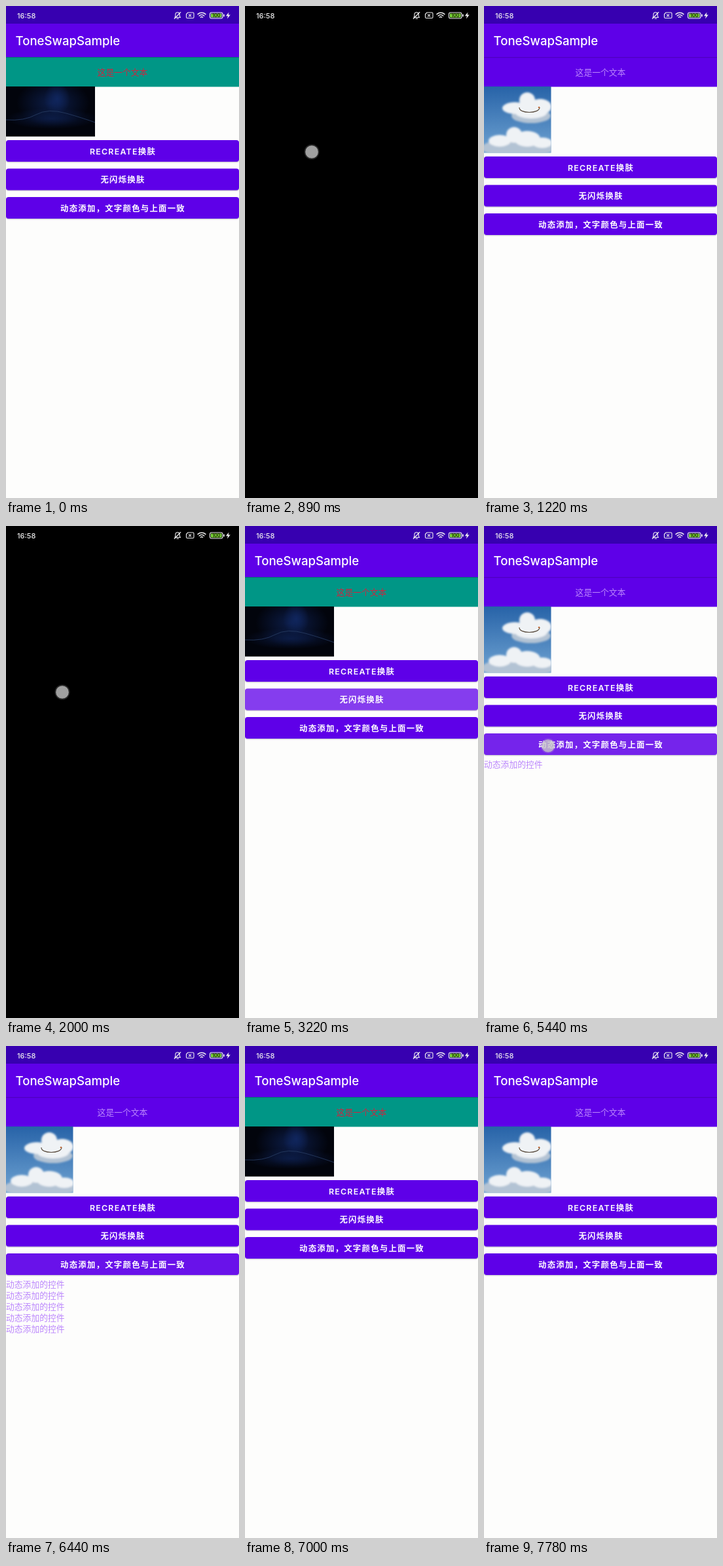
An HTML page that plays this animation: 356x752 px, repeating every 7890 ms.

```html
<!DOCTYPE html>
<html lang="zh-CN">
<head>
<meta charset="utf-8">
<title>Theme switch</title>
<style>
  html, body { margin: 0; width: 100%; height: 100%; overflow: hidden; background: #fdfdfc; }
  svg { display: block; width: 356px; height: 752px; }
  text { font-family: Inter, "Noto Sans CJK SC", "Noto Sans CJK", sans-serif; }
  .label { font-size: 12.4px; font-weight: 600; letter-spacing: 1.25px; fill: #fff; text-anchor: middle; }
  .item { font-size: 12.8px; fill: #bb86fc; }
  .line { fill: none; stroke: currentColor; stroke-width: 1.1; stroke-linecap: round; stroke-linejoin: round; }
</style>
</head>
<body>
<svg viewBox="0 0 356 752">
  <defs>
    <radialGradient id="blue"><stop offset="0" stop-color="#10265e"/><stop offset="1" stop-color="#10265e" stop-opacity="0"/></radialGradient>
    <linearGradient id="sky" x2="0" y2="1"><stop offset="0" stop-color="#2763a8"/><stop offset="1" stop-color="#6fa3d2"/></linearGradient>
    <filter id="soft" x="-20%" y="-20%" width="140%" height="140%"><feGaussianBlur stdDeviation="1.5"/></filter>
    <clipPath id="skyBox"><rect y="123" width="102.5" height="101.5"/></clipPath>
    <clipPath id="darkBox"><rect y="123" width="136" height="76.5"/></clipPath>
  </defs>

  <g id="page">
    <rect width="356" height="752" fill="#fdfdfc"/>
    <rect width="356" height="28" fill="#3700b0"/>
    <rect y="27" width="356" height="51" fill="#5e00e8"/>
    <text x="14.5" y="59.5" font-size="18.6" font-weight="500" fill="#fff">ToneSwapSample</text>
    <rect id="band" y="78" width="356" height="45.5"/>
    <rect y="78" width="356" height="1.2" fill="#200040" opacity=".25"/>
    <text id="caption" x="178" y="106" font-size="12.8" text-anchor="middle">这是一个文本</text>

    <g id="dark" clip-path="url(#darkBox)">
      <rect y="123" width="136" height="77" fill="#02040c"/>
      <ellipse cx="72" cy="148" rx="56" ry="36" fill="url(#blue)" opacity=".75"/>
      <ellipse cx="78" cy="142" rx="20" ry="24" fill="url(#blue)"/>
      <ellipse cx="70" cy="172" rx="70" ry="16" fill="url(#blue)" opacity=".6"/>
      <path d="M0 174Q28 176 46 166T92 164T136 178" fill="none" stroke="#2a3f66" stroke-width="1" opacity=".8"/>
    </g>

    <g id="light" clip-path="url(#skyBox)">
      <rect y="123" width="103" height="102" fill="url(#sky)"/>
      <g filter="url(#soft)">
        <g fill="#b3c3d4">
          <ellipse cx="72" cy="168" rx="30" ry="11"/>
          <ellipse cx="52" cy="217" rx="56" ry="14"/>
        </g>
        <g fill="#eff2f5">
          <circle cx="66" cy="144" r="12"/>
          <ellipse cx="47" cy="156" rx="19" ry="9"/>
          <ellipse cx="86" cy="154" rx="17" ry="12"/>
          <ellipse cx="72" cy="163" rx="24" ry="9"/>
          <circle cx="46" cy="197" r="12"/>
          <ellipse cx="24" cy="206" rx="17" ry="9"/>
          <ellipse cx="66" cy="203" rx="20" ry="12"/>
          <ellipse cx="89" cy="209" rx="15" ry="8"/>
        </g>
      </g>
      <path d="M54 155C53 165 85 165 85 155" fill="none" stroke="#584a3c" stroke-width="1.1"/>
      <circle cx="84" cy="155" r="1.3" fill="#c06a38"/>
    </g>

    <g id="buttons"></g>
    <g id="items"></g>
  </g>

  <rect id="black" width="356" height="752"/>

  <g color="#f0f0f0">
    <text x="17" y="18.6" font-size="11" font-weight="500" fill="currentColor">16:58</text>
    <g class="line">
      <path d="M258 17.5h8.5l-1.2-2v-2.5a3.2 3.2 0 0 0-6.4 0v2.5zM261 19.3h2.6M257.3 19.5l9.5-10"/>
      <path d="M278 10h7.5a1.5 1.5 0 0 1 1.5 1.5v5.5a1.5 1.5 0 0 1-1.5 1.5h-8.5a1.5 1.5 0 0 1-1.5-1.5v-4.5zM279.5 12.8l3.2 3.2m0-3.2l-3.2 3.2"/>
      <path d="M293 12.6a9 9 0 0 1 12 0M295.2 15a5.6 5.6 0 0 1 7.6 0M297.4 17.2a2.4 2.4 0 0 1 3.2 0" stroke-width="1.5"/>
      <rect x="311.5" y="10" width="19.5" height="9" rx="2.5"/>
      <path d="M333 13.3v2.4" stroke-width="1.6"/>
    </g>
    <rect x="313" y="11.5" width="16.5" height="6" rx="1" fill="#7edc3c"/>
    <text x="321.3" y="17.2" font-size="7.2" font-weight="700" text-anchor="middle" fill="#203000">100</text>
    <path d="M340.5 9.5l-4.5 5.8h3l-1 4.2 4.8-6h-3z" fill="currentColor"/>
  </g>

  <g id="dot" fill="#c8c8c8">
    <circle r="11.5" opacity=".2"/>
    <circle r="9.8" opacity=".75"/>
  </g>
</svg>

<script>
const LOOP = 7890, TICK = 111.1;
const DARK = 'dark', LIGHT = 'light', BLACK = 'black';
const PURPLE = '#5e00e8';

// [tick, screen]
const screens = [
  [0, DARK], [8, BLACK], [10, LIGHT], [18, BLACK], [20, DARK], [30, LIGHT],
  [37, DARK], [43, LIGHT], [62, DARK], [69, LIGHT]
];

// [tick, button, x, y, ticks held]
const taps = [
  [6, 0, 102, 223, 2], [17, 0, 86, 254, 2], [26, 1, 96, 266, 4],
  [34, 1, 94, 291, 3], [40, 1, 95, 267, 3],
  ...[47, 49, 51, 53, 55].map(tick => [tick, 2, 98, 336, 3]),
  [59, 1, 96, 291, 3], [66, 1, 95, 267, 3]
];

const ITEMS_GONE = 62;
const $ = id => document.getElementById(id);

function add(parent, tag, attrs, text = '') {
  const el = document.createElementNS('http://www.w3.org/2000/svg', tag);
  for (const key in attrs) el.setAttribute(key, attrs[key]);
  el.textContent = text;
  return parent.appendChild(el);
}

const show = (el, on) => { el.style.display = on ? '' : 'none'; };

const glows = ['RECREATE换肤', '无闪烁换肤', '动态添加，文字颜色与上面一致'].map((label, i) => {
  const y = 205 + 43.5 * i;
  const box = { x: 0, y, width: 356, height: 33, rx: 4 };
  add($('buttons'), 'rect', { ...box, y: y + 1.5, fill: '#303050', opacity: .2 });
  add($('buttons'), 'rect', { ...box, fill: PURPLE });
  const glow = add($('buttons'), 'rect', { ...box, fill: '#fff' });
  add($('buttons'), 'text', { class: 'label', x: 178.5, y: y + 21.5 }, label);
  return glow;
});

const items = Array.from({ length: 5 }, (_, i) =>
  add($('items'), 'text', { class: 'item', x: 0, y: 368.8 + 17.1 * i }, '动态添加的控件'));

function render(time) {
  const tick = Math.floor(time / TICK + .08);
  const screen = screens.findLast(s => s[0] <= tick)[1];
  const light = screen === LIGHT;

  show($('page'), screen !== BLACK);
  show($('black'), screen === BLACK);
  show($('dark'), !light);
  show($('light'), light);
  $('band').setAttribute('fill', light ? PURPLE : '#009686');
  $('caption').setAttribute('fill', light ? '#bb86fc' : '#d0243f');
  $('buttons').setAttribute('transform', `translate(0 ${light ? 25 : 0})`);

  const added = taps.filter(t => t[1] === 2 && t[0] < tick).length;
  items.forEach((el, i) => show(el, i < added && tick < ITEMS_GONE));

  const tap = taps.findLast(t => t[0] <= tick);
  const age = tap ? tick - tap[0] : Infinity;
  glows.forEach((el, i) => {
    const lit = tap && i === tap[1] && age <= tap[4];
    el.setAttribute('opacity', !lit ? 0 : age === tap[4] ? .07 : age ? .24 : .14);
  });

  show($('dot'), age < 3);
  if (tap) $('dot').setAttribute('transform', `translate(${tap[2]} ${tap[3]})`);
}

const start = performance.now();
function loop() {
  render((performance.now() - start) % LOOP);
  requestAnimationFrame(loop);
}
loop();
</script>
</body>
</html>
```
